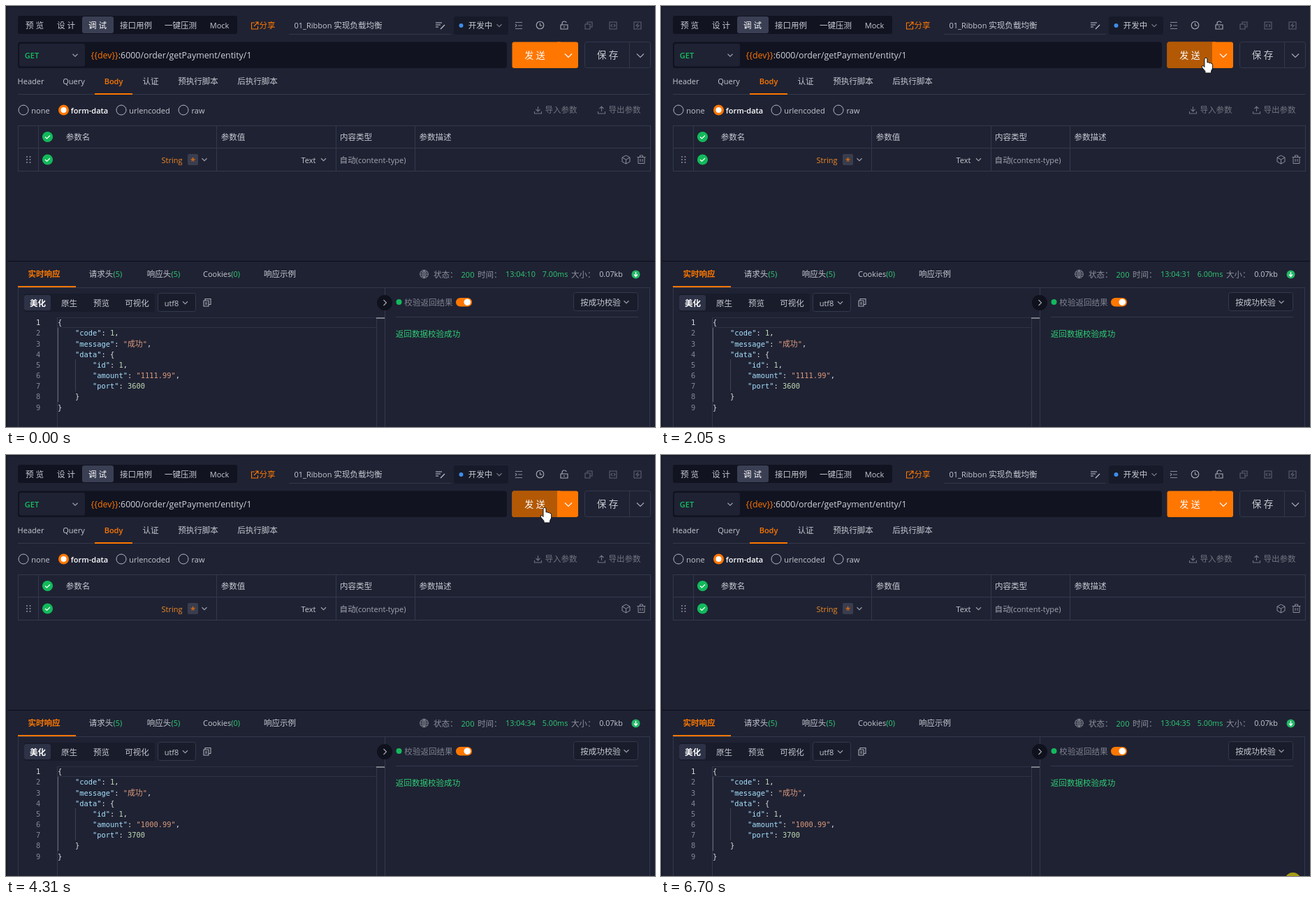
An HTML page that plays this animation: 929 by 603 pixels, repeating every 6780 ms.

```html
<!DOCTYPE html>
<html lang="zh-CN">
<head>
<meta charset="utf-8">
<style>
html, body { margin: 0; width: 100%; height: 100%; overflow: hidden; background: #1f2233; }
svg { display: block; }
text { font-family: "Open Sans", "Noto Sans CJK SC", "Noto Sans CJK", sans-serif; text-anchor: middle; white-space: pre; }
.code { font-family: "DejaVu Sans Mono", "Noto Sans CJK SC", monospace; text-anchor: start; }
.start { text-anchor: start; }
.bold { font-weight: 600; }
</style>
</head>
<body>
<svg id="stage" width="929" height="603" viewBox="0 0 929 603"></svg>
<script>
const BG = '#1f2233', DARK = '#111320', EDGE = '#33384c', ORANGE = '#ff7700', HOVER = '#b35905',
  GREEN = '#2fcb74', TEXT = '#c6c8d0', DIM = '#70747f', WHITE = '#ffffff';

// Text is centred on x and y; Chinese runs are set slightly larger than Latin ones.
const text = (x, y, s, fill = TEXT, size = 11, cls = '', id = '') =>
  `<text x="${x}" y="${y + size * .37}" fill="${fill}" font-size="${size}" class="${cls}" id="${id}">` +
  s.replace(/[\u3000-\u9fff\uff00-\uffef]+/g, m => `<tspan font-size="${size * 1.05}">${m}</tspan>`) + '</text>';
const rect = (x, y, w, h, fill, r = 0, more = '') =>
  `<rect x="${x}" y="${y}" width="${w}" height="${h}" rx="${r}" fill="${fill}" ${more}/>`;
const frame = (x, y, w, h, fill = 'none', r = 3) => rect(x, y, w, h, fill, r, `stroke="${EDGE}"`);
const dot = (x, y, r, fill, more = '') => `<circle cx="${x}" cy="${y}" r="${r}" fill="${fill}" ${more}/>`;
const path = (d, stroke, x = 0, y = 0, w = 1.1) =>
  `<path d="${d}" transform="translate(${x} ${y})" fill="none" stroke="${stroke}" stroke-width="${w}"/>`;
const line = (d, stroke = EDGE) => path(d, stroke, 0, 0, 1);
const chevron = (x, y, c = '#a0a3ae', s = 3.5) => path(`M${-s} ${-s / 2}L0 ${s / 2}L${s} ${-s / 2}`, c, x, y);
const check = y => dot(59.5, y, 7.6, '#12b95a') + path('M-3.5 0l2.5 2.5 4.5-4.5', WHITE, 59.5, y, 1.2);
const tint = (s, c) => `<tspan fill="${c}">${s}</tspan>`;

function topBar() {
  const icon = (d, x, c) => path(d, c, x, 28);
  return rect(17, 14, 314, 26, DARK, 3) + rect(109, 15, 45, 24, '#3a3f54', 3) +
    [[41, '预 览'], [86, '设 计'], [131, '调 试', WHITE], [186, '接口用例'], [250, '一键压测'], [305.5, 'Mock']]
      .map(([x, s, c]) => text(x, 27.5, s, c)).join('') +
    icon('M0-4h-4.5v9h9V1M1-5h4v4M5-5L-1 1', 356, ORANGE) + text(374, 28, '分享', ORANGE) +
    text(475.5, 28, '01_Ribbon 实现负载均衡') + line('M405 40.5H637') +
    icon('M-7-4h9M-7-1h7M-7 2h4M0 5l6-6', 622, TEXT) +
    rect(641, 15, 78, 26, '#171a29', 3) + dot(651.5, 28, 3, '#3f8de8') + text(679, 28, '开发中') + chevron(706, 28, '#777b88') +
    icon('M-5-4.5h10M-1 0h6M-5 4.5h10M-5-2l2 2-2 2', 734, '#858893') +
    dot(764.5, 27.5, 5.3, 'none', 'stroke="#a9abb4" stroke-width="1.1"') + icon('M0-3.5V0h3', 764.5, '#a9abb4') +
    icon('M-5-1h10v6h-10zM-3-1v-2q0-3 3-3t3 2M0 1v2', 799, '#a9abb4') +
    icon('M-5-2h7v7h-7zM-2-2v-3h7v7h-3', 834, '#5c6070') +
    icon('M-5-5h10v10h-10zM-1-2l-2 2 2 2M1-2l2 2-2 2', 869, '#5c6070') +
    icon('M-5-5h10v10h-10zM1-3l-3 3h4l-3 3', 904, '#5c6070');
}

function request() {
  return rect(17, 51.5, 700, 37.5, DARK, 4) + rect(19, 54, 94, 32.5, BG, 3) +
    text(37, 70.5, 'GET', '#14c060', 11, 'bold') + chevron(99, 70.5) +
    text(121.5, 70, tint('{{dev}}', ORANGE) + ':6000/order/getPayment/entity/1', '#d0d2d8', 12.4, 'start') +
    `<g id="send">${rect(724.5, 51.5, 70, 37.5, ORANGE, 3)}${rect(724.5, 51.5, 70, 37.5, HOVER, 3, 'id="mainDark"')}` +
    `${text(757, 70.5, '发 送', WHITE, 13, '', 'label')}</g>` +
    rect(789, 51.5, 30, 37.5, ORANGE, 3) + rect(789, 51.5, 5, 37.5, ORANGE) + rect(789, 51.5, 30, 37.5, HOVER, 3, 'id="dropDark"') +
    chevron(805, 71, WHITE, 5) +
    frame(828.5, 51.5, 94, 37) + line('M892.5 52V89') + text(861, 70.5, '保 存', TEXT, 13) + chevron(908, 71, '#a9abb4', 5) +
    line('M17 126.5H922') + rect(127, 125, 54, 2, ORANGE) +
    [[35.5, 'Header'], [97, 'Query'], [154, 'Body', ORANGE, 'bold'], [207, '认证'], [275, '预执行脚本'], [360, '后执行脚本']]
      .map(([x, s, c, b]) => text(x, 108, s, c, 11, b)).join('') +
    [25, 165, 254].map(x => dot(x, 149, 7, 'none', 'stroke="#b4b6bf"')).join('') +
    dot(82.5, 149, 7.5, ORANGE) + dot(82.5, 149, 4, WHITE) +
    text(49.5, 149.5, 'none') + text(119.5, 149.5, 'form-data', WHITE, 11, 'bold') +
    text(205.5, 149.5, 'urlencoded') + text(275, 149.5, 'raw') +
    path('M0-5v7M-3-1l3 3 3-3M-5 2v3h10V2', DIM, 761.5, 149) + text(794.5, 149, '导入参数', DIM) +
    path('M0 2v-7M-3-2l3-3 3 3M-5 2v3h10V2', DIM, 852.5, 149) + text(885.5, 149, '导出参数', DIM);
}

function table() {
  const dots = [0, 1, 2, 3, 4, 5].map(i => dot(30 + i % 2 * 4.5, 216 + (i >> 1) * 4, 1, '#8e919c')).join('');
  return frame(17.5, 171.5, 905, 65, 'none', 0) +
    line('M17 203.5H922M46.5 172V236M301.5 172V236M472.5 172V236M585.5 172V236') +
    check(187.5) + check(220) + dots +
    [[103, '参数名'], [325, '参数值'], [501, '内容类型'], [614.5, '参数描述']].map(([x, s]) => text(x, 188, s)).join('') +
    text(237.5, 221, 'String', '#f08a24') + rect(260, 212, 15, 16, '#3a3d4e', 2) + text(267.5, 222, '*', ORANGE, 13) +
    chevron(284, 220) + text(433, 221, 'Text') + chevron(454.5, 220) + text(525, 221, '自动(content-type)', '#a4a7b2') +
    path('M0-6l5.5 3v6L0 6l-5.5-3v-6zM-5.5-3L0 0l5.5-3M0 0v6', '#8a8d98', 887.5, 220, 1) +
    path('M-6-3.5h12M-4.5-3.5V5.5h9v-9M-2-4v-2h4v2M-1.5-1v4M1.5-1v4', '#8a8d98', 909.5, 220, 1);
}

function response() {
  const key = s => tint(`"${s}"`, '#a8e2ff') + ': ', num = (s, id = '') => `<tspan id="${id}" fill="#bfd8b2">${s}</tspan>`,
    str = (s, id = '') => `<tspan id="${id}" fill="#dc9a7c">${s}</tspan>`;
  const rows = [[0, '{'], [4, key('code') + num(1) + ','], [4, key('message') + str('"成功"') + ','], [4, key('data') + '{'],
    [8, key('id') + num(1) + ','], [8, key('amount') + str('', 'amount') + ','], [8, key('port') + num('', 'port')], [4, '}'], [0, '}']];
  const code = rows.map(([indent, s], i) => {
    const y = 453.5 + i * 15.15;
    return text(43, y, String(i + 1), i ? '#858790' : '#d8d8dc', 10.38, 'code') +
      text(74 + indent * 6.25, y, s, '#e0e0e0', 10.38, 'code');
  }).join('');
  return line('M2 365.5H929', '#0b0d16') + line('M17 403.5H922M17.5 404V603M921.5 404V603M542.5 404V603M558 445.5H905') +
    rect(17, 401, 83, 2, ORANGE) + text(54.5, 384, '实时响应', ORANGE, 11, 'bold') +
    text(142.5, 384, '请求头' + tint('(5)', GREEN)) + text(225.5, 384, '响应头' + tint('(5)', GREEN)) +
    text(308.5, 384, 'Cookies' + tint('(0)', GREEN)) + text(392, 384, '响应示例') +
    dot(598.5, 384, 5.8, 'none', 'stroke="#858893"') + path('M-6 0H6M0-6V6M-5-3H5M-5 3H5M0-6q-5 6 0 12q5-6 0-12', '#858893', 598.5, 384, .9) +
    text(612, 384.5, '状态：', '#8d909b', 11, 'start') + text(661, 384.5, '200', GREEN) +
    text(675, 384.5, '时间：', '#8d909b', 11, 'start') + text(736.5, 384.5, '', GREEN, 10.8, '', 'clock') +
    text(786, 384.5, '', GREEN, 10.8, '', 'cost') + text(809, 384.5, '大小：', '#8d909b', 11, 'start') +
    text(866, 384.5, '0.07kb', TEXT, 10.8) + dot(901.5, 384.5, 6, '#22b866') + path('M0-3.5v6M-2.5 0L0 3l2.5-3', WHITE, 901.5, 384.5, 1.3) +
    rect(26, 412, 187, 26, '#191c2b', 3) + rect(26, 414, 38, 22, '#2d3246', 3) +
    text(45.5, 425.5, '美化', WHITE, 11, 'bold') + text(90.5, 425.5, '原生') + text(136.5, 425.5, '预览') + text(187.5, 425.5, '可视化') +
    frame(217.5, 411.5, 54, 26, '#191c2b') + text(237, 425.5, 'utf8') + chevron(256.5, 425) +
    path('M-5-3h7v8h-7zM-3-3v-2.5h8v8H2M-3 0h3M-3 2h3', '#a9abb4', 288, 425) +
    dot(542, 425, 11, '#0f111c') + path('M-2-4l4 4-4 4', '#a9abb4', 542.5, 425) +
    dot(562.5, 424, 4, '#14b85c') + text(605, 424.5, '校验返回结果', '#7f838f') +
    rect(644, 418, 23, 12.5, ORANGE, 6.25) + dot(660.3, 424.2, 4.8, WHITE) +
    frame(812.5, 410.5, 92, 26, '#191c2b') + text(851, 424.5, '按成功校验') + chevron(888, 424) +
    text(604, 470, '返回数据校验成功', GREEN) +
    line('M74 446.5H530M74 460.5H530', '#2c3144') + line('M73.5 446V603M530.5 446V603') +
    rect(530, 446, 12, 2, '#7b7e88') + line('M74.5 461V567', '#63666f') + line('M99.5 506V552', '#3d4152') + code;
}

function overlays() {
  return `<defs><linearGradient id="glow"><stop stop-color="#4a8fe0" stop-opacity=".1"/>
    <stop offset=".57" stop-color="#4a8fe0" stop-opacity=".5"/><stop offset=".6" stop-color="#4a8fe0"/></linearGradient></defs>
    <g id="loading">${rect(2, 366, 927, 237, '#1c1e2f', 0, 'opacity=".86"')}${rect(17, 366, 1, 2, 'url(#glow)', 0, 'id="bar"')}
    ${text(470, 468, '发送中...', '#d8dae0')}${text(470, 510, '取消发送', '#8391ad')}</g>
    ${dot(0, 0, 11.5, '#a79b14', 'id="press"')}
    <path id="arrow" d="M0 0V16.5l4-3.5 3 6 2.5-1-3-6h5.5z" fill="#fff" stroke="#111"/>
    <path id="hand" d="M-2 1.5Q0-1.5 2 1.5V7q2-1 3 .7 2-.7 2.700.8 2-.3 2 2V15l-2 4v3H-1v-2.500L-5.500 14q-1-3 1.500-2.500l2 2z" fill="#fff" stroke="#111"/>
    <g id="stop">${dot(0, 0, 7.5, WHITE)}${dot(0, 0, 5.3, 'none', 'stroke="#c8141e" stroke-width="2.2"')}${path('M-4-4L4 4', '#c8141e', 0, 0, 2.2)}</g>`;
}

const $ = id => document.getElementById(id);
$('stage').innerHTML = rect(0, 0, 929, 603, BG) + rect(0, 0, 929, 1.5, '#151827') + rect(0, 0, 1.5, 603, '#151827') +
  topBar() + request() + table() + response() + overlays();

const LOOP = 6780;
const sends = [[1340, 1610], [2460, 2900], [3580, 4020], [4840, 5280]];
// Result shown before the first send and after each one: second, ms, amount, port.
const results = [[10, 7, '1111.99', 3600], [31, 6, '1111.99', 3600], [33, 7, '1111.99', 3600],
  [34, 5, '1000.99', 3700], [35, 5, '1000.99', 3700]];
// Pointer paths: time, x, y.
const moves = [
  [[70, 907, 575], [270, 890, 420], [430, 868, 240], [570, 822, 125], [710, 786, 75], [860, 782, 74], [1180, 780, 74],
    [2050, 780, 74], [2190, 771, 75], [4840, 771, 75], [5030, 775, 74], [5170, 834, 66.5], [5240, 873, 63], [5310, 905, 60], [5370, 911, 59]],
  [[5840, 924, 583], [6100, 904, 600], [6170, 902, 603]]
];

function pointer(t) {
  const track = moves.find(m => t >= m[0][0] && t < m[m.length - 1][0]);
  if (!track) return null;
  const i = track.findIndex(k => k[0] > t), [t0, x0, y0] = track[i - 1], [t1, x1, y1] = track[i];
  const p = (t - t0) / (t1 - t0);
  return [x0 + (x1 - x0) * p, y0 + (y1 - y0) * p];
}

const fade = (t, start, time = 300) => 1 - (1 - Math.min(1, Math.max(0, (t - start) / time))) ** 2;
const show = (id, on) => $(id).style.display = on ? '' : 'none';
const place = (id, x, y) => $(id).setAttribute('transform', `translate(${x} ${y})`);

function draw(t) {
  const done = sends.filter(s => t >= s[1]).length;
  const active = sends.find(s => t >= s[0] && t < s[1]);
  const [sec, ms, amount, port] = results[done];
  $('clock').textContent = '13:04:' + sec;
  $('cost').textContent = ms + '.00ms';
  $('amount').textContent = `"${amount}"`;
  $('port').textContent = port;

  show('loading', active);
  if (active) $('bar').setAttribute('width', 1 + (t - active[0]) * .495);
  $('label').textContent = active ? '发送中...' : '发 送';
  $('send').setAttribute('opacity', active ? .5 : 1);
  const hover = active || done === 4 ? 0 : fade(t, done ? sends[done - 1][1] : 770);
  $('mainDark').setAttribute('opacity', hover);
  $('dropDark').setAttribute('opacity', .4 * fade(t, 660, 110) * (1 - fade(t, 770)));

  const pos = pointer(t);
  const kind = !pos ? '' : active ? 'stop' : pos[1] > 50 && pos[1] < 89 ? 'hand' : 'arrow';
  for (const id of ['arrow', 'hand', 'stop']) show(id, id === kind);
  if (pos) place(kind, ...pos);

  const late = t >= 6700;
  show('press', late || t >= 6440 && t < 6500);
  place('press', late ? 904.5 : 903.5, late ? 609.5 : 603.5);
}

const begin = performance.now();
function tick() {
  draw((performance.now() - begin) % LOOP);
  requestAnimationFrame(tick);
}
tick();
</script>
</body>
</html>
```
